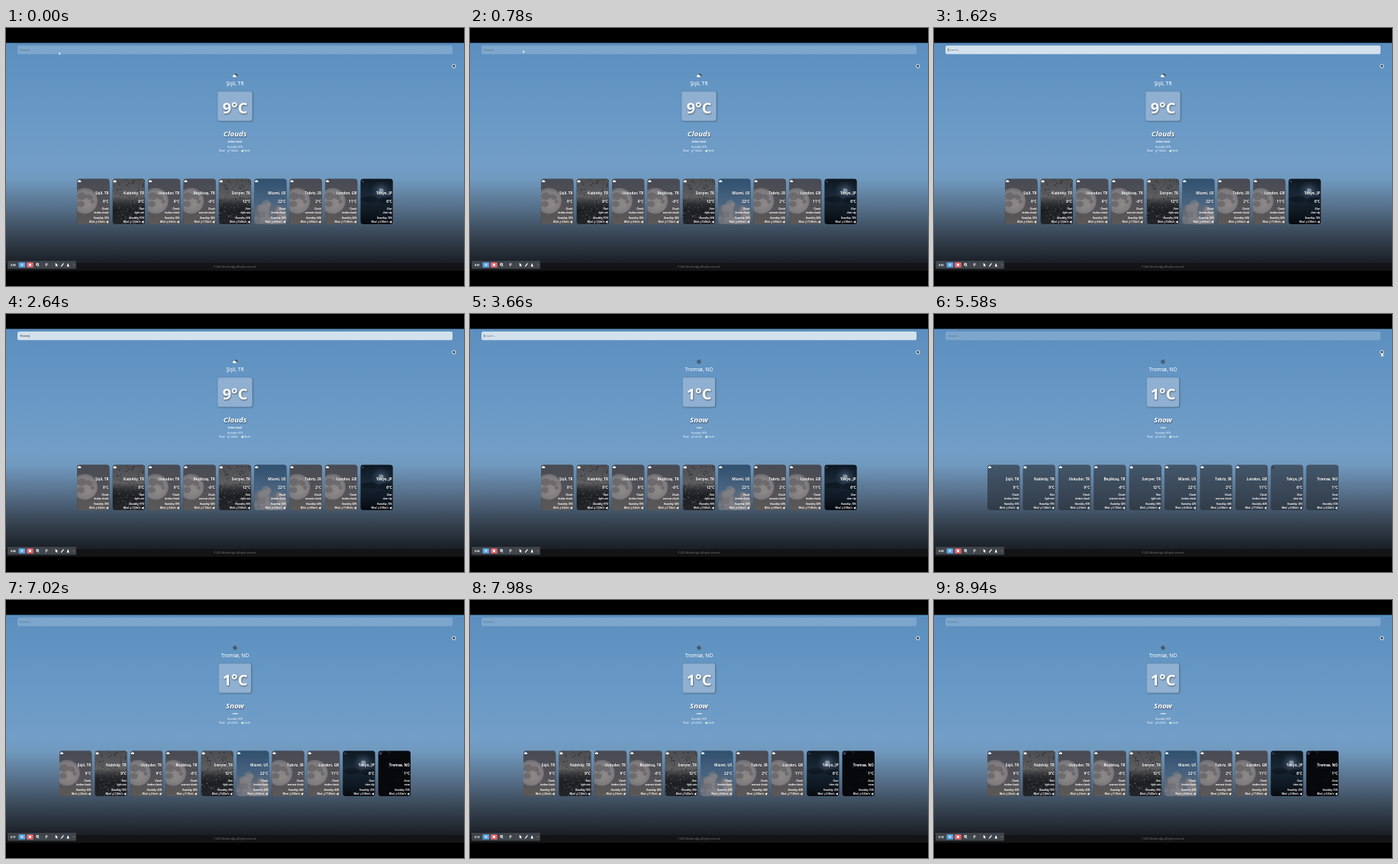
These frames come from a looping animation (600x338 px, 9000 ms). An HTML page with a canvas:

```html
<!DOCTYPE html>
<html lang="en">
<head>
<meta charset="utf-8">
<title>Weather App</title>
<style>
html, body { margin: 0; width: 100%; height: 100%; overflow: hidden; background: #000; }
canvas { display: block; width: 600px; height: 338px; }
</style>
</head>
<body>
<canvas id="stage"></canvas>
<script>
const LOOP = 9000, W = 600, H = 338;
const FOCUS = 900, TYPE = 1900, KEY = 150, ENTER = 2950, RESULT = 3150, CLICK = 5400, LOADED = 5800;
const FONT = '"Noto Sans", "Open Sans", sans-serif';
const canvas = document.getElementById('stage');
const dpr = window.devicePixelRatio || 1;
canvas.width = W * dpr;
canvas.height = H * dpr;
const ctx = canvas.getContext('2d');

const cities = [
  ['Şişli, TR', 9, 'Clouds', 'broken clouds', 93, '2.6'],
  ['Kadıköy, TR', 9, 'Rain', 'light rain', 91, '1.52'],
  ['Uskudar, TR', 9, 'Clouds', 'broken clouds', 95, '2.6'],
  ['Beşiktaş, TR', -6, 'Clouds', 'overcast clouds', 82, '1.73'],
  ['Sarıyer, TR', 12, 'Rain', 'light rain', 96, '5.62'],
  ['Miami, US', 22, 'Clouds', 'broken clouds', 52, '4.63'],
  ['Tabriz, IR', 2, 'Clouds', 'overcast clouds', 64, '2.06'],
  ['London, GB', 11, 'Clouds', 'broken clouds', 82, '11.83'],
  ['Tokyo, JP', 6, 'Clear', 'clear sky', 72, '2.06'],
  ['Tromsø, NO', 1, 'Snow', 'snow', 93, '6.22']
];

const clamp = v => Math.max(0, Math.min(1, v));
const lerp = (a, b, k) => a + (b - a) * k;
const ease = k => k * k * (3 - 2 * k);

function random(seed) {
  return () => (seed = (seed * 16807) % 2147483647) / 2147483647;
}

function gradient(y0, y1, stops) {
  const g = ctx.createLinearGradient(0, y0, 0, y1);
  stops.forEach(([p, c]) => g.addColorStop(p, c));
  return g;
}

function rect(x, y, w, h, r, fill) {
  ctx.fillStyle = fill;
  ctx.beginPath();
  ctx.roundRect(x, y, w, h, r);
  ctx.fill();
}

function disc(x, y, r, fill, ry = r, turn = 0) {
  ctx.fillStyle = fill;
  ctx.beginPath();
  ctx.ellipse(x, y, r, ry, turn, 0, 7);
  ctx.fill();
}

function poly(points, fill) {
  ctx.fillStyle = fill;
  ctx.beginPath();
  points.forEach(([x, y]) => ctx.lineTo(x, y));
  ctx.closePath();
  ctx.fill();
}

function line(points, color, width = 0.6) {
  ctx.strokeStyle = color;
  ctx.lineWidth = width;
  ctx.beginPath();
  points.forEach(([x, y]) => ctx.lineTo(x, y));
  ctx.stroke();
}

function text(str, x, y, size, style = '400', align = 'left', color = '#fff') {
  ctx.font = `${style} ${size}px ${FONT}`;
  ctx.textAlign = align;
  ctx.fillStyle = color;
  ctx.fillText(str, x, y);
}

function shadowed(blur, offset, draw) {
  ctx.save();
  ctx.shadowColor = 'rgba(0,0,0,.5)';
  ctx.shadowBlur = blur * dpr;
  ctx.shadowOffsetX = ctx.shadowOffsetY = offset * dpr;
  draw();
  ctx.restore();
}

function cloud(x, y, s, color) {
  disc(x - s, y, s * 0.8, color);
  disc(x, y - s * 0.5, s, color);
  disc(x + s, y, s * 0.8, color);
  rect(x - s, y, s * 2, s * 0.8, 0, color);
}

function arrowIcon(x, y) {
  poly([[x - 1.9, y + 0.2], [x + 1.8, y - 1.7], [x + 0.9, y + 1.9], [x - 0.2, y + 0.7]], '#fff');
}

function windIcon(x, y) {
  line([[x - 1.2, y + 0.3], [x + 0.8, y + 0.3], [x + 1.1, y - 0.9], [x + 0.2, y - 1.2]], '#fff', 0.5);
  line([[x - 1, y + 1.1], [x + 0.5, y + 1.1]], '#fff', 0.5);
}

function weatherIcon(kind, x, y, s) {
  if (kind === 'Clear') return disc(x, y, s * 1.3, '#343b46');
  if (kind === 'Snow') {
    ctx.save();
    ctx.translate(x, y);
    ctx.rotate(0.3);
    for (let i = 0; i < 3; i++) {
      line([[-s * 1.7, 0], [s * 1.7, 0]], '#46566a', s * 0.8);
      ctx.rotate(Math.PI / 3);
    }
    ctx.restore();
    return;
  }
  cloud(x, y, s, '#fff');
  if (kind === 'Rain') {
    for (let i = -1; i < 2; i++) line([[x + i * s, y + s], [x + i * s - 0.4, y + s * 1.8]], '#cdd6df', 0.4);
  }
}

function moonPicture(x, y, w, h) {
  rect(x, y, w, h, 0, gradient(y, y + h, [[0, '#484a53'], [0.5, '#525157'], [1, '#5c5857']]));
  const mx = x + 10, my = y + 29, r = 17;
  const g = ctx.createRadialGradient(mx + 4, my + 5, 3, mx, my, r);
  g.addColorStop(0, '#8b8786');
  g.addColorStop(0.8, '#7f7c7f');
  g.addColorStop(1, '#6c6a70');
  disc(mx, my, r, g);
  const dark = 'rgba(72,70,78,.38)';
  disc(mx - 4, my - 6, 6, dark, 5);
  disc(mx + 6, my - 5, 5, dark, 3.5, 0.5);
  disc(mx - 5, my + 4, 5, dark, 4);
  disc(mx + 10, my + 1, 2.5, dark);
}

function rainPicture(x, y, w, h, seed) {
  rect(x, y, w, h, 0, gradient(y, y + h, [
    [0, '#4b4d51'], [0.4, '#5e5e60'], [0.55, '#2c2d30'], [0.7, '#1d1e21'], [1, '#242529']
  ]));
  const rnd = random(seed);
  for (let i = 0; i < 150; i++) {
    const u = rnd(), v = rnd(), r = 0.25 + rnd() * 0.5;
    disc(x + u * w, y + v * h, r, v < 0.5 ? 'rgba(20,21,24,.65)' : 'rgba(150,150,152,.45)', r * 1.3);
  }
}

function skyPicture(x, y, w, h) {
  rect(x, y, w, h, 0, gradient(y, y + h, [[0, '#30506f'], [0.5, '#48637f'], [1, '#6d737d']]));
  const rnd = random(31);
  for (let i = 0; i < 44; i++) {
    const u = rnd(), top = 30 + Math.abs(u - 0.35) * 22;
    disc(x + u * w, y + lerp(top, h, rnd()), 3 + rnd() * 3, i % 3 ? 'rgba(136,131,134,.5)' : 'rgba(102,104,114,.45)');
  }
}

function nightPicture(x, y, w, h) {
  rect(x, y, w, h, 0, gradient(y, y + h, [[0, '#0d1721'], [0.35, '#192735'], [0.7, '#101a25'], [1, '#070b11']]));
  const g = ctx.createRadialGradient(x + 27, y + 16, 2, x + 27, y + 16, 14);
  g.addColorStop(0, 'rgba(110,135,160,.45)');
  g.addColorStop(1, 'rgba(60,85,110,0)');
  disc(x + 27, y + 16, 14, g);
  disc(x + 27, y + 16, 3.2, '#8094a6');
  disc(x + 12, y + 27, 11, 'rgba(10,18,27,.55)', 4);
  disc(x + 33, y + 28, 10, 'rgba(10,18,27,.55)', 4);
}

function snowPicture(x, y, w, h) {
  rect(x, y, w, h, 0, '#06080c');
  const rnd = random(77);
  for (let i = 0; i < 26; i++) disc(x + rnd() * w, y + rnd() * h, 0.3 + rnd() * 0.35, 'rgba(120,130,145,.5)');
}

function picture(i, x, y, w, h) {
  const kind = cities[i][2];
  if (i === 5) skyPicture(x, y, w, h);
  else if (kind === 'Rain') rainPicture(x, y, w, h, 11 + i);
  else if (kind === 'Clear') nightPicture(x, y, w, h);
  else if (kind === 'Snow') snowPicture(x, y, w, h);
  else moonPicture(x, y, w, h);
}

function card(i, x, loaded) {
  const [name, temp, kind, detail, humidity, wind] = cities[i];
  const y = 197.5, w = 42.4, h = 59.5, right = x + w - 1;
  rect(x, y, w, h, 4, 'rgba(38,42,50,.6)');
  if (loaded) {
    ctx.save();
    ctx.beginPath();
    ctx.roundRect(x, y, w, h, 4);
    ctx.clip();
    picture(i, x, y, w, h);
    ctx.restore();
  }
  weatherIcon(kind, x + 3, y + 3.5, 1.2);
  shadowed(1, 0.4, () => {
    text(name, right, 217.5, 4.7, '900', 'right');
    text(temp + '°C', right, 228.6, 4.7, '900', 'right');
  });
  const small = (str, base, end = right) => text(str, end, base, 2.9, 'italic 600', 'right');
  small(kind, 238);
  small(detail, 243);
  small(`Humidity: ${humidity}%`, 250);
  const speed = wind + 'm/s';
  small(speed, 255.1, right - 5);
  const left = right - 6.5 - ctx.measureText(speed).width;
  windIcon(left - 0.5, 254);
  small('Wind', 255.1, left - 3);
  arrowIcon(right - 2, 254);
}

function background() {
  rect(0, 0, W, H, 0, '#000');
  rect(0, 19.6, W, 288.4, 0, gradient(20, 308, [
    [0, '#5c8fbf'], [0.3, '#6798c5'], [0.55, '#729ec8'], [0.62, '#7099be'],
    [0.75, '#566f89'], [0.88, '#364351'], [1, '#1a1e25']
  ]));
  rect(0, 308, W, 10, 0, '#141416');
  text('© 2022 Weather App. All rights reserved.', 300, 314, 2.95, '400', 'center', '#77787a');
}

function search(t) {
  const focus = clamp((t - FOCUS) / 150) * (1 - clamp((t - CLICK) / 150));
  rect(15, 23, 570, 11.3, 2.5, `rgba(255,255,255,${lerp(0.2, 0.73, focus)})`);
  const count = t < ENTER ? Math.max(0, Math.floor((t - TYPE) / KEY) + 1) : 0;
  const typed = 'Tromsø'.slice(0, count);
  const color = typed ? '#222' : focus > 0.5 ? '#6f767d' : '#5d7186';
  text(typed || 'Search...', 18.3, 30.2, 4, '400', 'left', color);
  const caretX = 18 + (typed ? ctx.measureText(typed).width + 0.3 : 0);
  const typing = t >= TYPE && t < ENTER;
  const since = t - (t < ENTER ? FOCUS : ENTER);
  if (focus > 0.5 && (typing || since % 663 < 331)) rect(caretX, 26.2, 0.4, 5, 0, '#444');
}

function current(t) {
  const snow = t >= RESULT;
  const info = cities[snow ? 9 : 0];
  if (snow) weatherIcon('Snow', 300, 62.6, 1.8);
  else {
    cloud(300.8, 61.9, 1.5, '#3c4653');
    cloud(299.4, 63.2, 1.4, '#fff');
  }
  text(info[0], 300, 74.5, 6.6, '500', 'center');
  const w = snow ? 42.5 : 45.5;
  shadowed(2, 0.5, () => rect(300 - w / 2, 83.2, w, 38.6, 3, '#90b0d1'));
  shadowed(2, 0.7, () => text(info[1] + '°C', 300, 111.8, 20, '900', 'center'));
  shadowed(1.5, 0.5, () => text(info[2], 300, 142, 9.6, 'italic 800', 'center'));
  text(info[3], 300, 149.6, 2.8, 'italic 700', 'center');
  text(`Humidity: ${snow ? 93 : 97}%`, 300, 157, 3.1, 'italic 500', 'center');
  text('Wind:', 279.3, 162, 3, 'italic 500');
  windIcon(291, 161);
  text(snow ? '6.22m/s' : '1.54m/s', 293.2, 162, 3, 'italic 500');
  arrowIcon(309.3, 161);
  text(snow ? 'South' : 'North', 312, 162, 3, 'italic 500');
}

function cards(t) {
  const n = t >= CLICK ? 10 : 9;
  const loaded = t < CLICK || t >= LOADED;
  for (let i = 0; i < n; i++) card(i, 302 - n * 23.2 + i * 46.4, loaded);
}

function addButton() {
  disc(586.7, 50, 2.7, '#c5d3e0');
  disc(586.7, 50, 1.4, '#253445');
}

function toolbar(t) {
  rect(2, 305, 90, 10.6, 1.2, '#3f444b');
  text(`0:${String(Math.floor(t / 1000 * 1.6 + 0.45)).padStart(2, '0')}`, 6, 311.6, 3.4, '700');
  rect(16.5, 307, 8.8, 6.7, 1.3, '#58a0df');
  rect(19.6, 308.8, 0.9, 3, 0, '#fff');
  rect(21.4, 308.8, 0.9, 3, 0, '#fff');
  rect(27, 307, 8.8, 6.7, 1.3, '#e3616d');
  rect(29.9, 308.8, 3, 3, 0.3, '#fff');
  disc(41.2, 309.8, 2, '#e4e6e9');
  disc(41.2, 309.8, 0.8, '#3f444b');
  line([[42, 311.2], [43, 312.6]], '#e4e6e9', 0.9);
  line([[47.2, 307], [47.2, 313.5]], '#585e66', 0.4);
  disc(53.2, 309.5, 1.6, '#d5d8dc');
  disc(53.6, 309.5, 0.7, '#3f444b');
  line([[52.4, 310], [52.4, 312.6]], '#d5d8dc', 0.8);
  line([[60.5, 306.5], [60.5, 314]], '#585e66', 0.4);
  poly([[64.7, 307.8], [64.9, 312.4], [66, 311.3], [67, 313], [67.6, 312.5], [66.8, 311], [68, 310.6]], '#fff');
  line([[72.2, 312.4], [75.5, 308.4]], '#fff', 1.2);
  poly([[79.8, 312.5], [80.2, 310.5], [81.2, 308], [82.2, 310.5], [83, 312.5]], '#fff');
  line([[88.3, 309], [89.2, 310.2], [88.3, 311.4]], '#b9bdc2', 0.5);
}

function pointer(x, y) {
  poly([[x, y], [x, y + 3.4], [x + 0.8, y + 2.7], [x + 1.4, y + 3.8], [x + 1.9, y + 3.5], [x + 1.4, y + 2.5], [x + 2.4, y + 2.4]], '#fff');
}

function hand(x, y) {
  rect(x - 0.5, y - 2.2, 1, 4, 0.4, '#fff');
  rect(x - 1.2, y, 3, 2.6, 0.8, '#fff');
}

function mouse(t) {
  if (t < FOCUS) pointer(69.5, lerp(31.5, 29, ease(t / FOCUS)));
  else if (t >= 4200 && t < 5150) {
    const go = ease(clamp((t - 4200) / 700)), end = ease(clamp((t - 4920) / 230));
    pointer(lerp(lerp(70, 574.5, go), 586.5, end), lerp(lerp(30, 54.5, go), 51.5, end));
  } else if (t >= 5150 && t < 6000) hand(587, 53);
}

function frame(now) {
  const t = now % LOOP;
  ctx.setTransform(dpr, 0, 0, dpr, 0, 0);
  background();
  search(t);
  addButton();
  current(t);
  cards(t);
  toolbar(t);
  mouse(t);
  requestAnimationFrame(frame);
}
frame(performance.now());
</script>
</body>
</html>
```
